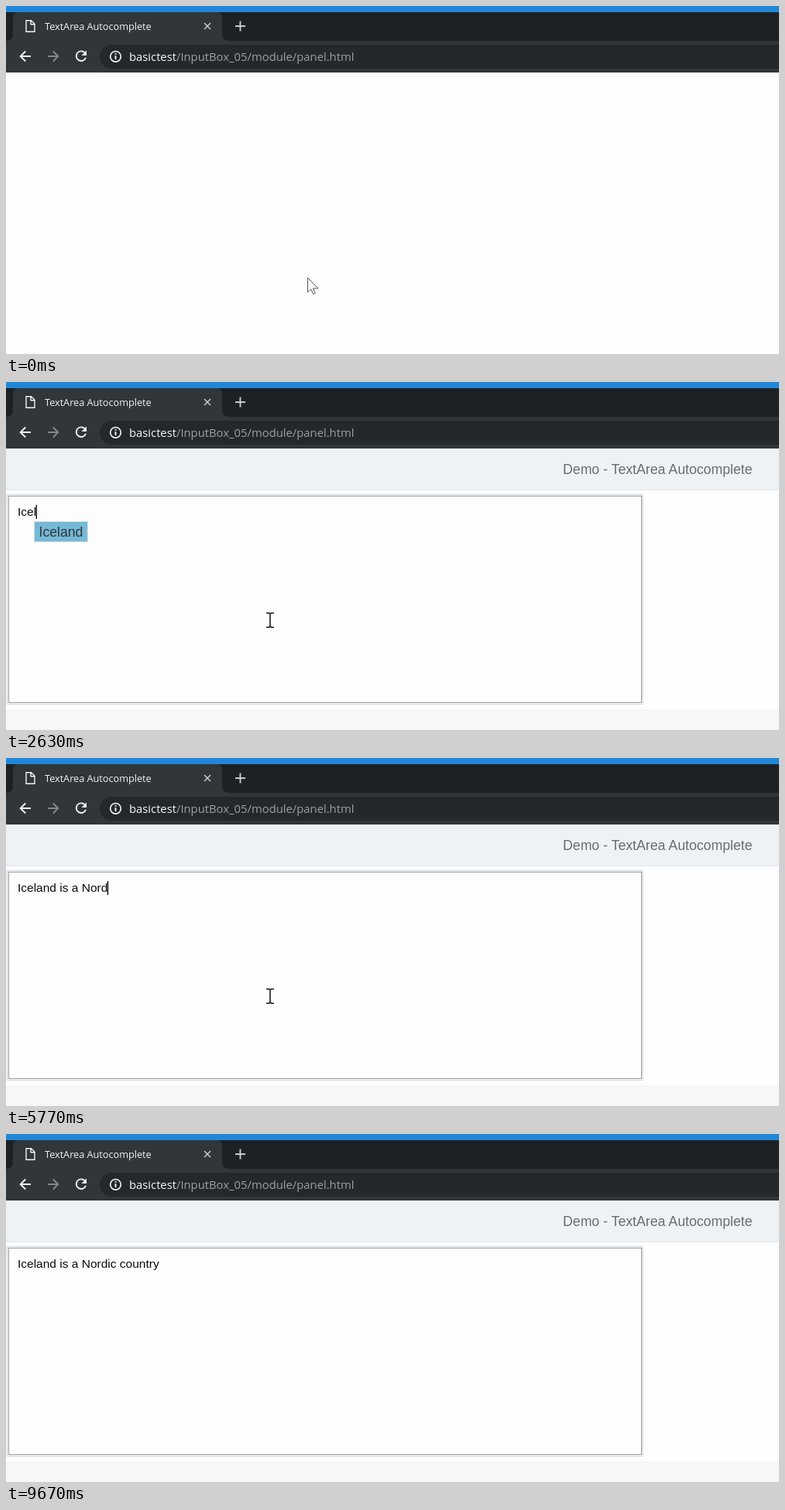
Write an HTML page that moves like this. It is 998x450 px and loops after 9.71 s.

```html
<!DOCTYPE html>
<html lang="en">
<head>
<meta charset="utf-8">
<title>TextArea Autocomplete</title>
<style>
  html, body { margin: 0; width: 100%; height: 100%; overflow: hidden; background: #fdfdfd; }
  svg { display: block; width: 998px; height: 450px; }
  #browser text { font-family: "Open Sans", "Noto Sans", sans-serif; }
  #page text { font-family: "Liberation Sans", Arial, sans-serif; }
  .line { fill: none; stroke: #f1f3f4; stroke-width: 1.9; }
  .thin { fill: none; stroke: #c8cbce; stroke-width: 1.6; }
  .item { font-size: 17.65px; fill: #32363a; }
</style>
</head>
<body>
<svg viewBox="0 0 998 450" xmlns="http://www.w3.org/2000/svg">
  <rect width="998" height="450" fill="#fdfdfd"/>

  <g id="page">
    <rect y="86" width="998" height="53" fill="#eff2f4"/>
    <rect y="139" width="998" height="1" fill="#dde8f2"/>
    <rect y="423" width="998" height="27" fill="#f7f7f7"/>
    <text x="963.5" y="119" text-anchor="end" font-size="17.7" fill="#6a6d70">Demo - TextArea Autocomplete</text>
    <rect x="1.5" y="145.5" width="820.5" height="271" fill="#fdfdfd" stroke="#cfcfd6"/>
    <rect id="focus" x="3.5" y="147.5" width="817" height="267" fill="none" stroke="#34343c" stroke-dasharray="1 1"/>
    <text id="typed" x="15" y="173" font-size="15.5" fill="#0c0c0c"></text>
    <rect id="caret" y="159" width="1.3" height="18" fill="#000"/>
    <g id="list"></g>
  </g>

  <g id="browser">
    <rect width="998" height="8" fill="#2187d6"/>
    <rect y="8" width="998" height="37" fill="#1e2124"/>
    <path d="M0 45Q9 45 9 36V16Q9 8 17 8H271Q279 8 279 16V36Q279 45 288 45H998V86H0Z" fill="#31363a"/>
    <rect x="121" y="50" width="910" height="31" rx="15.5" fill="#25282b"/>
    <path class="line" d="M26 18.7H32.5L37 23.2V33.3H26ZM32 18.7V23.8H37" style="stroke-width:1.4"/>
    <text x="50" y="30.5" font-size="12.7" fill="#f1f3f4">TextArea Autocomplete</text>
    <path class="thin" d="M256 22L264 30M264 22L256 30"/>
    <path class="thin" d="M302.5 19.5V32.5M296 26H309" style="stroke-width:1.9"/>
    <path class="line" d="M32 65H19M25.2 58.5L18.7 65L25.2 71.5"/>
    <path class="line" d="M54 65H67M60.8 58.5L67.3 65L60.8 71.5" style="stroke:#84888b"/>
    <path class="line" d="M101.7 60.4A6.3 6.3 0 1 0 103 66.8"/>
    <path d="M104 57.5V64H97.5Z" fill="#f1f3f4"/>
    <circle class="line" cx="141.5" cy="65.3" r="6.8" style="stroke-width:1.7"/>
    <path class="line" d="M141.5 64.3V69M141.5 61V62.8"/>
    <text x="159" y="70.5" font-size="14.8" fill="#9aa0a6"><tspan fill="#f6f8f9">basictest</tspan>/InputBox_05/module/panel.html</text>
  </g>

  <path id="arrow" d="M0 0V18.5L4.2 14.6L7.2 21L9.8 19.9L7 13.6H13.6Z" fill="#fdfdfd" stroke="#55585c"/>
  <path id="beam" d="M-5 -9.3H-1.6L0 -8.3L1.6 -9.3H5M0 -8.3V8.3M-5 9.3H-1.6L0 8.3L1.6 9.3H5" fill="none" stroke="#1c1c1c" stroke-width="1.6"/>
</svg>

<script>
const LOOP = 9710, LOAD = 500, CLICK = 1100, LEAVE = 9000, BLINK = 530;
const TYPED_SIZE = 15.5, ITEM_SIZE = 17.65;
const NS = "http://www.w3.org/2000/svg";
const $ = id => document.getElementById(id);
const pen = document.createElement("canvas").getContext("2d");

const countries = ("Afghanistan|Albania|Algeria|American Samoa|AndorrA|Angola|Anguilla|Antarctica|" +
  "Antigua and Barbuda|Argentina|Cambodia|Cameroon|Canada|Cape Verde|Cayman Islands|" +
  "Central African Republic|Chad|Chile|China|Christmas Island|Cocos (Keeling) Islands|Colombia|" +
  "Comoros|Congo|Cook Islands|Costa Rica|Iceland|India|Indonesia|Iran, Islamic Republic Of|Iraq|" +
  "Ireland|Isle of Man|Israel|Italy|Namibia|Nauru|Nepal|Netherlands|Netherlands Antilles|" +
  "New Caledonia|New Zealand|Nicaragua|Niger|Nigeria|Norfolk Island|Northern Mariana Islands|Norway").split("|");

const sentence = "Iceland is a Nordic country";
// [time, letters shown]
const keys = [
  [2050, 1], [2250, 2], [2430, 3], [2600, 4], [2980, 7],
  [3150, 8], [3350, 9], [3500, 10], [3650, 11], [3850, 12], [3980, 13],
  [4650, 14], [4950, 15], [5350, 16], [5680, 17], [6000, 18], [6200, 19], [6400, 20],
  [6600, 21], [6850, 22], [7080, 23], [7280, 24], [7480, 25], [7650, 26], [7820, 27]
];

function measure(text, size) {
  pen.font = size + 'px "Liberation Sans", Arial, sans-serif';
  return pen.measureText(text).width;
}

function add(parent, tag, attrs, text = "") {
  const el = document.createElementNS(NS, tag);
  for (const k in attrs) el.setAttribute(k, attrs[k]);
  el.textContent = text;
  parent.append(el);
}

function matches(text) {
  const word = text.trim().split(" ").pop().toLowerCase();
  if (!word || text === "Iceland") return [];
  return countries.filter(c => c.toLowerCase().startsWith(word)).slice(0, 10);
}

function drawList(items, x) {
  const list = $("list"), step = 26.25, top = 180.5;
  list.replaceChildren();
  const width = Math.max(...items.map(c => measure(c, ITEM_SIZE))) + 12;
  items.forEach((name, i) => {
    const y = top + i * step;
    add(list, "rect", { x, y, width, height: step, fill: i ? "#fdfdfd" : "#74b9d6", stroke: "#dcdfe2" });
    add(list, "text", { x: x + 6, y: y + 19, class: "item" }, name);
  });
}

function show(id, on) {
  $(id).setAttribute("visibility", on ? "inherit" : "hidden");
}

let shown = null;

function draw(t) {
  const loaded = t >= LOAD, focused = t >= CLICK;
  show("page", loaded);
  show("focus", focused);

  let last = CLICK, count = 0;
  for (const [at, n] of keys) if (t >= at) { last = at; count = n; }
  const text = sentence.slice(0, count);
  const end = 15 + measure(text, TYPED_SIZE);
  if (text !== shown) {
    shown = text;
    $("typed").textContent = text;
    drawList(matches(text), Math.round(end - 3.5) + 0.5);
  }
  $("caret").setAttribute("x", end - 0.5);
  show("caret", loaded && focused && Math.floor((t - last) / BLINK) % 2 === 0);

  const p = Math.min(1, Math.max(0, (t - 550) / 450));
  const s = p * p * (3 - 2 * p);
  const x = 389.5 - 47.7 * s - (t > 1500 ? 0.8 : 0);
  const y = 351.5 - 43.5 * s;
  for (const id of ["arrow", "beam"]) $(id).setAttribute("transform", `translate(${x} ${y})`);
  show("arrow", !loaded);
  show("beam", loaded && t < LEAVE);
}

const start = performance.now();
function tick() {
  draw((performance.now() - start) % LOOP);
  requestAnimationFrame(tick);
}
draw(0);
requestAnimationFrame(tick);
</script>
</body>
</html>
```
